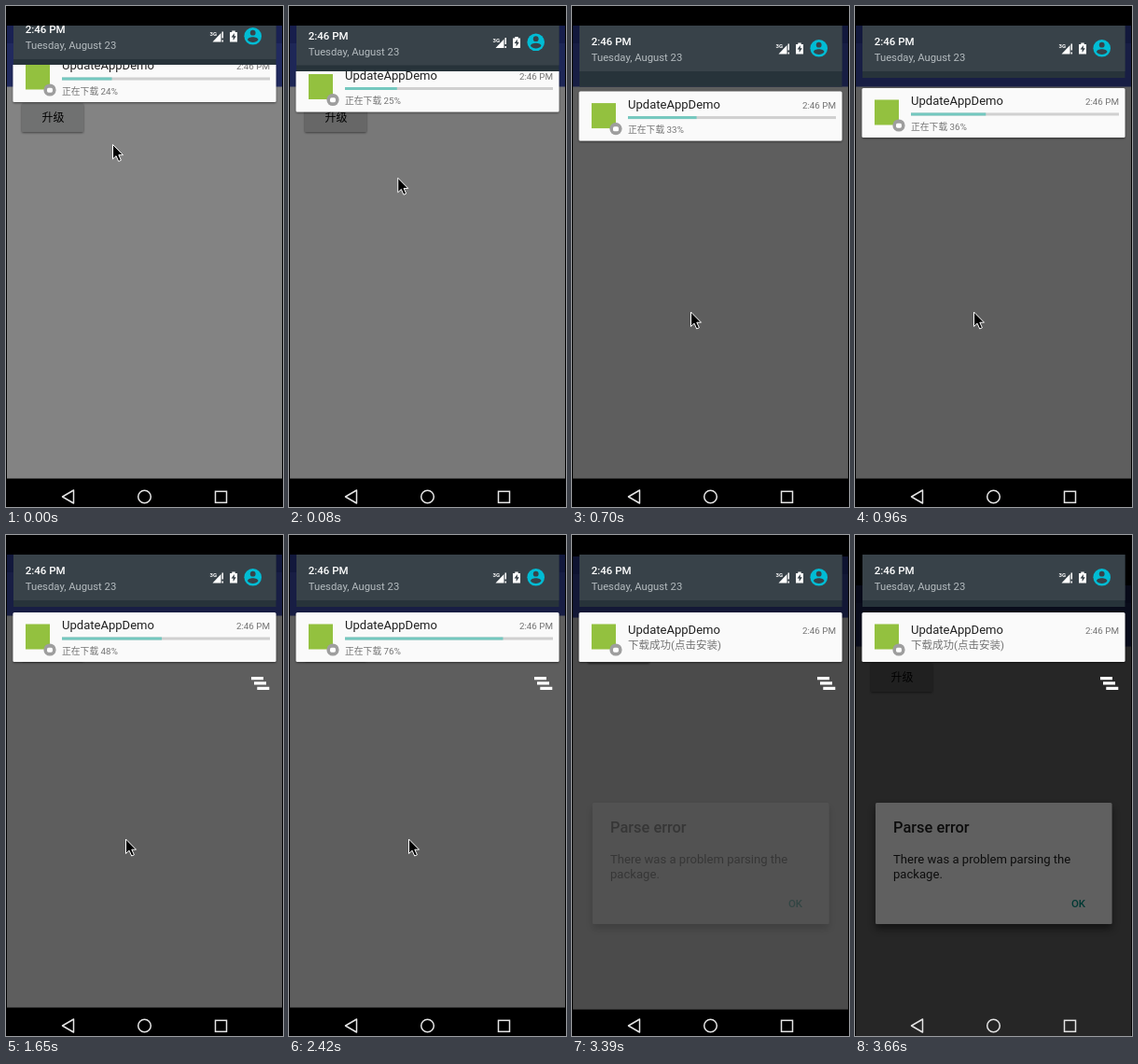
Recreate the animation shown at these times as an HTML page. Size 297 by 537 pixels, loop 3690 ms.

```html
<!DOCTYPE html>
<html lang="en">
<head>
<meta charset="utf-8">
<title>Update download</title>
<style>
  html, body { margin: 0; width: 100%; height: 100%; overflow: hidden; background: #000; }
  svg { display: block; width: 297px; height: 537px; }
  text { font-family: Roboto, "Noto Sans CJK SC", "Noto Sans CJK", sans-serif; white-space: pre; }
  .mid { font-weight: 500; }
</style>
</head>
<body>
<svg viewBox="0 0 297 537">
  <defs>
    <clipPath id="stage"><rect x="1" y="21" width="295" height="516"/></clipPath>
    <clipPath id="below"><rect id="belowRect" x="0" width="297" height="470"/></clipPath>
    <filter id="soft" x="-10%" y="-20%" width="120%" height="150%">
      <feDropShadow dx="0" dy="1" stdDeviation="1" flood-opacity=".5"/>
    </filter>
    <filter id="deep" x="-10%" y="-10%" width="120%" height="130%">
      <feDropShadow dx="0" dy="5" stdDeviation="4" flood-opacity=".5"/>
    </filter>
  </defs>
  <rect width="297" height="537"/>

  <g clip-path="url(#stage)">
    <g id="page">
      <rect x="1" y="21" width="295" height="485.5" fill="#fafafa"/>
      <rect x="1" y="21" width="295" height="65.5" fill="#3f51b5"/>
      <rect x="1" y="21" width="295" height="19" fill="#303f9f"/>
      <rect x="17" y="104" width="66" height="31" rx="1.5" fill="#d6d7d7" filter="url(#soft)"/>
      <text x="38.5" y="124" font-size="12">升级</text>
    </g>
    <rect id="dim" x="1" y="21" width="295" height="516"/>
    <g id="dialog">
      <rect x="22" y="287" width="253.5" height="130" rx="1.5" fill="#fff" filter="url(#deep)"/>
      <text class="mid" x="41" y="319" font-size="16.4" fill="#212121">Parse error</text>
      <g font-size="13.1" fill="#212121">
        <text x="41" y="352">There was a problem parsing the</text>
        <text x="41" y="367.5">package.</text>
      </g>
      <text class="mid" x="232" y="399" font-size="11.4" fill="#009688">OK</text>
    </g>
    <rect id="scrim" x="1" y="21" width="295" height="516"/>

    <g clip-path="url(#below)">
      <g id="card">
        <rect x="7.5" width="282" height="53" rx="1.5" fill="#fafafa" filter="url(#soft)"/>
        <rect x="21" y="12.5" width="26" height="27" fill="#93c13f"/>
        <circle cx="47" cy="40" r="6.6" fill="#9e9e9e"/>
        <rect x="44" y="37.7" width="6" height="5" rx="1.6" fill="#fff"/>
        <g id="head">
          <text x="60" y="18" font-size="13.05" fill="#212121">UpdateAppDemo</text>
          <text x="283" y="18" font-size="9.8" fill="#757575" text-anchor="end">2:46 PM</text>
        </g>
        <g id="loading">
          <rect x="60" y="26.5" width="223" height="3" fill="#d0d0d0"/>
          <rect id="bar" x="60" y="26.5" height="3" fill="#74c8bf"/>
          <text id="label" x="60" y="44.7" font-size="9.8" fill="#757575"></text>
        </g>
        <text id="done" x="60" y="38.5" font-size="11.5" fill="#757575">下载成功(点击安装)</text>
      </g>
    </g>

    <rect id="strip" x="8" y="21" width="281.5" fill="#27333a"/>
    <g id="header">
      <rect x="8" y="0" width="281.5" height="70" fill="#384249"/>
      <text class="mid" x="20.7" y="42" font-size="11.5" fill="#fff">2:46 PM</text>
      <text x="20.7" y="59" font-size="11.3" fill="#b4bbbf">Tuesday, August 23</text>
      <g fill="#fff">
        <text x="218.5" y="45" font-size="6" font-weight="700">3G</text>
        <path d="M221.5 51.5L230.5 42V51.5zM231.5 40.500h1.500v7h-1.500zM231.500 49.500h1.500v2h-1.500z"/>
        <path d="M240 41h2.300v-1.500h3.400v1.500h2.300v10.500h-8z"/>
      </g>
      <path d="M244.800 42l-3.200 4.600h2v3.400l3.200-4.800h-2z" fill="#384249"/>
      <circle cx="264.700" cy="45.300" r="9.300" fill="#00bcd4"/>
      <circle cx="264.700" cy="41.700" r="2.900" fill="#384249"/>
      <path d="M259 49.300c0-4 11.400-4 11.400 0c-2.500 3.700-8.900 3.700-11.400 0z" fill="#384249"/>
    </g>
    <path id="clear" d="M263 152h13v3.200h-13zM266 157.300h13v3.200h-13zM269.300 162.700h13v3.200h-13z" fill="#fff"/>
  </g>

  <g fill="none" stroke="#e4e4e4" stroke-width="1.5">
    <path d="M60.500 526L72.500 519V533z" stroke-linejoin="round"/>
    <circle cx="148.500" cy="526" r="6.800"/>
    <rect x="224.500" y="520.300" width="12" height="12"/>
  </g>
  <path id="cursor" d="M0 0V15.500L3.600 12.200L6.200 18L8.900 16.800L6.300 11.200H11z" stroke="#fff" stroke-width="1"/>
</svg>
<script>
const LOOP = 3690, TICK = 87, LEAD = 16;
const el = id => document.getElementById(id);
const set = (id, attrs) => {
  for (const k in attrs) el(id).setAttribute(k, attrs[k]);
};
const show = (id, on) => set(id, { visibility: on ? 'visible' : 'hidden' });
const shift = (x, y) => ({ transform: `translate(${x} ${y})` });

// Linear track through [tick, value] points
function track(n, pts) {
  if (n <= pts[0][0]) return pts[0][1];
  for (let i = 1; i < pts.length; i++) {
    const [a, u] = pts[i - 1], [b, v] = pts[i];
    if (n <= b) return u + (v - u) * (n - a) / (b - a);
  }
  return pts[pts.length - 1][1];
}

function draw(ms) {
  const n = Math.floor((ms + LEAD) / TICK);

  // pulling the shade down, then settling
  const edge = track(n, [[0, 63], [4, 91], [6, 93], [11, 77]]);
  const top = track(n, [[0, 50], [4, 92], [6, 94], [11, 88], [15, 83]]);
  set('header', shift(0, track(n, [[0, -13], [2, 0]])));
  set('strip', { height: edge - 21 });
  set('belowRect', { y: edge });
  set('card', shift(0, top));
  set('scrim', { opacity: track(n, [[0, 0.48], [4, 0.624]]) });

  // download progress
  const pct = Math.round(track(n, [[0, 24], [4, 28], [11, 36], [15, 42], [16, 42], [19, 48], [28, 76], [35, 98]]));
  const done = n >= 36;
  set('bar', { width: 2.23 * pct });
  el('label').textContent = `正在下载 ${pct}%`;
  show('loading', !done);
  show('done', done);
  set('head', shift(0, done ? 5 : 0));
  set('clear', { opacity: track(n, [[16, 0], [19, 1]]) });

  // error dialog
  const open = track(n, [[38, 0], [42, 1]]);
  set('page', shift(0, 33 * open * open));
  set('dim', { opacity: 0.6 * track(n, [[38, 0], [41, 1]]) });
  set('dialog', { opacity: track(n, [[38, 0], [41, 1]]) });

  // pointer
  const x = track(n, [[0, 114.5], [4, 123.5], [6, 127.5], [11, 127.5], [14, 128.5]]);
  const y = track(n, [[0, 148.5], [4, 291.5], [6, 328], [11, 328], [14, 326], [30, 326], [34, 378]]);
  set('cursor', shift(x, y));
  show('cursor', n < 35);
}

const start = performance.now();
function loop() {
  draw((performance.now() - start) % LOOP);
  requestAnimationFrame(loop);
}
draw(0);
requestAnimationFrame(loop);
</script>
</body>
</html>
```
